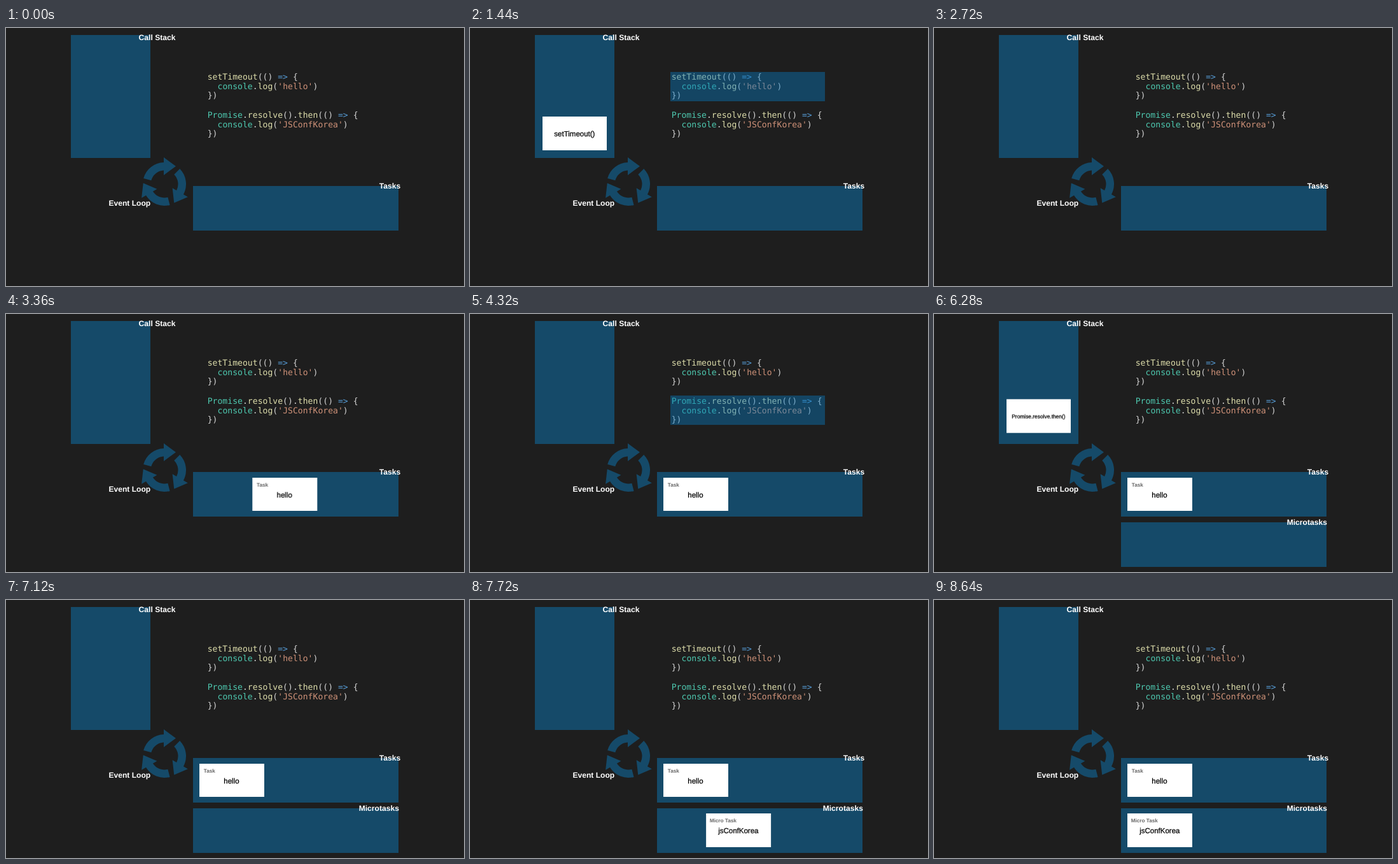
These frames come from a looping animation (720x405 px, 9160 ms). An HTML page:

```html
<!DOCTYPE html>
<html lang="en">
<head>
<meta charset="utf-8">
<title>Event loop</title>
<style>
  html, body { margin: 0; width: 100%; height: 100%; overflow: hidden; background: #1e1e1e; }
  svg { display: block; width: 720px; height: 405px; }
  text { text-rendering: geometricPrecision; white-space: pre; }

  :root {
    --enter: cubic-bezier(.322, 1, .632, 1);
    --leave: cubic-bezier(.368, 0, .678, 0);
  }

  .blue { fill: #154a69; }
  .label { font: bold 12.1px "Liberation Sans", Arial, sans-serif; fill: #fff; }

  .code { font: 13.12px "DejaVu Sans Mono", Menlo, monospace; fill: #d4d4d4; }
  .fn { fill: #dcdcaa; }
  .obj { fill: #4ec9b0; }
  .op { fill: #569cd6; }
  .str { fill: #ce9178; }

  .card rect { fill: #fff; }
  .card text {
    font: 11.5px "Liberation Sans", Arial, sans-serif;
    fill: #000; stroke: #000; stroke-width: .25px; text-anchor: middle;
  }
  .card .small { font-size: 8.4px; }
  .card .kind { font-size: 8.2px; font-weight: bold; fill: #666; stroke: none; text-anchor: start; }

  .mark { fill: rgba(8, 122, 190, .43); }

  .mark, .card, #micro { animation: 9160ms linear infinite; }
  #mark1 { animation-name: mark1; animation-timing-function: step-end; }
  #mark2 { animation-name: mark2; animation-timing-function: step-end; }
  #micro { animation-name: micro; animation-timing-function: step-end; }
  #call1 { animation-name: call1; }
  #call2 { animation-name: call2; }
  #task1 { animation-name: task1; }
  #task2 { animation-name: task2; }

  @keyframes mark1 { 0% { opacity: 0 } 5.24% { opacity: 1 } 20.96%, 100% { opacity: 0 } }
  @keyframes mark2 { 0% { opacity: 0 } 47.161% { opacity: 1 } 68.122%, 100% { opacity: 0 } }
  @keyframes micro { 0% { opacity: 0 } 62.882%, 100% { opacity: 1 } }

  @keyframes call1 {
    0%, 5.24% { transform: translateY(-200px); animation-timing-function: var(--enter) }
    15.72%, 20.96% { transform: none; animation-timing-function: var(--leave) }
    31.441%, 100% { transform: translateY(-200px) }
  }
  @keyframes call2 {
    0%, 47.161% { transform: translateY(-200px); animation-timing-function: var(--enter) }
    57.642%, 68.122% { transform: none; animation-timing-function: var(--leave) }
    78.602%, 100% { transform: translateY(-200px) }
  }
  @keyframes task1 {
    0%, 31.441% { transform: translateX(424px); animation-timing-function: var(--enter) }
    41.921%, 100% { transform: none }
  }
  @keyframes task2 {
    0%, 78.602% { transform: translateX(424px); animation-timing-function: var(--enter) }
    89.083%, 100% { transform: none }
  }
</style>
</head>
<body>
<svg viewBox="0 0 720 405">
  <defs>
    <path id="arrow" d="M-32.8-9A34 34 0 0 1-1-34V-42L18-28-1-14V-21.5A21.5 21.5 0 0 0-20.7-5.7Z"/>
  </defs>

  <g class="blue">
    <rect x="102" y="11" width="125" height="193"/>
    <rect x="294" y="248" width="323" height="70"/>
    <g transform="translate(249 245)">
      <use href="#arrow"/>
      <use href="#arrow" transform="rotate(120)"/>
      <use href="#arrow" transform="rotate(240)"/>
    </g>
  </g>

  <g class="label">
    <text x="208.6" y="19">Call Stack</text>
    <text x="161.4" y="279">Event Loop</text>
    <text x="586.8" y="252">Tasks</text>
  </g>
  <g id="micro">
    <rect class="blue" x="294" y="327" width="323" height="70"/>
    <text class="label" x="554.7" y="331">Microtasks</text>
  </g>

  <g class="code">
    <text x="316.7" y="80.8"><tspan class="fn">setTimeout</tspan>(() <tspan class="op">=&gt;</tspan> {</text>
    <text x="332.5" y="95.8"><tspan class="obj">console</tspan>.<tspan class="fn">log</tspan>(<tspan class="str">'hello'</tspan>)</text>
    <text x="316.7" y="110.4">})</text>
    <text x="316.7" y="140.8"><tspan class="obj">Promise</tspan>.<tspan class="fn">resolve</tspan>().<tspan class="fn">then</tspan>(() <tspan class="op">=&gt;</tspan> {</text>
    <text x="332.5" y="155.8"><tspan class="obj">console</tspan>.<tspan class="fn">log</tspan>(<tspan class="str">'JSConfKorea'</tspan>)</text>
    <text x="316.7" y="170.4">})</text>
  </g>

  <rect id="mark1" class="mark" x="315" y="69" width="243" height="46"/>
  <rect id="mark2" class="mark" x="315" y="128" width="243" height="46"/>

  <g id="call1" class="card">
    <rect x="114" y="139" width="101" height="53"/>
    <text x="164.4" y="170">setTimeout()</text>
  </g>
  <g id="call2" class="card">
    <rect x="114" y="139" width="101" height="53"/>
    <text class="small" x="164.4" y="169">Promise.resolve.then()</text>
  </g>
  <g id="task1" class="card">
    <rect x="304" y="257" width="102" height="52"/>
    <text class="kind" x="310.8" y="271">Task</text>
    <text x="354.4" y="288">hello</text>
  </g>
  <g id="task2" class="card">
    <rect x="304" y="335" width="102" height="53"/>
    <text class="kind" x="309.7" y="349">Micro Task</text>
    <text x="354.8" y="366">jsConfKorea</text>
  </g>
</svg>
</body>
</html>
```
